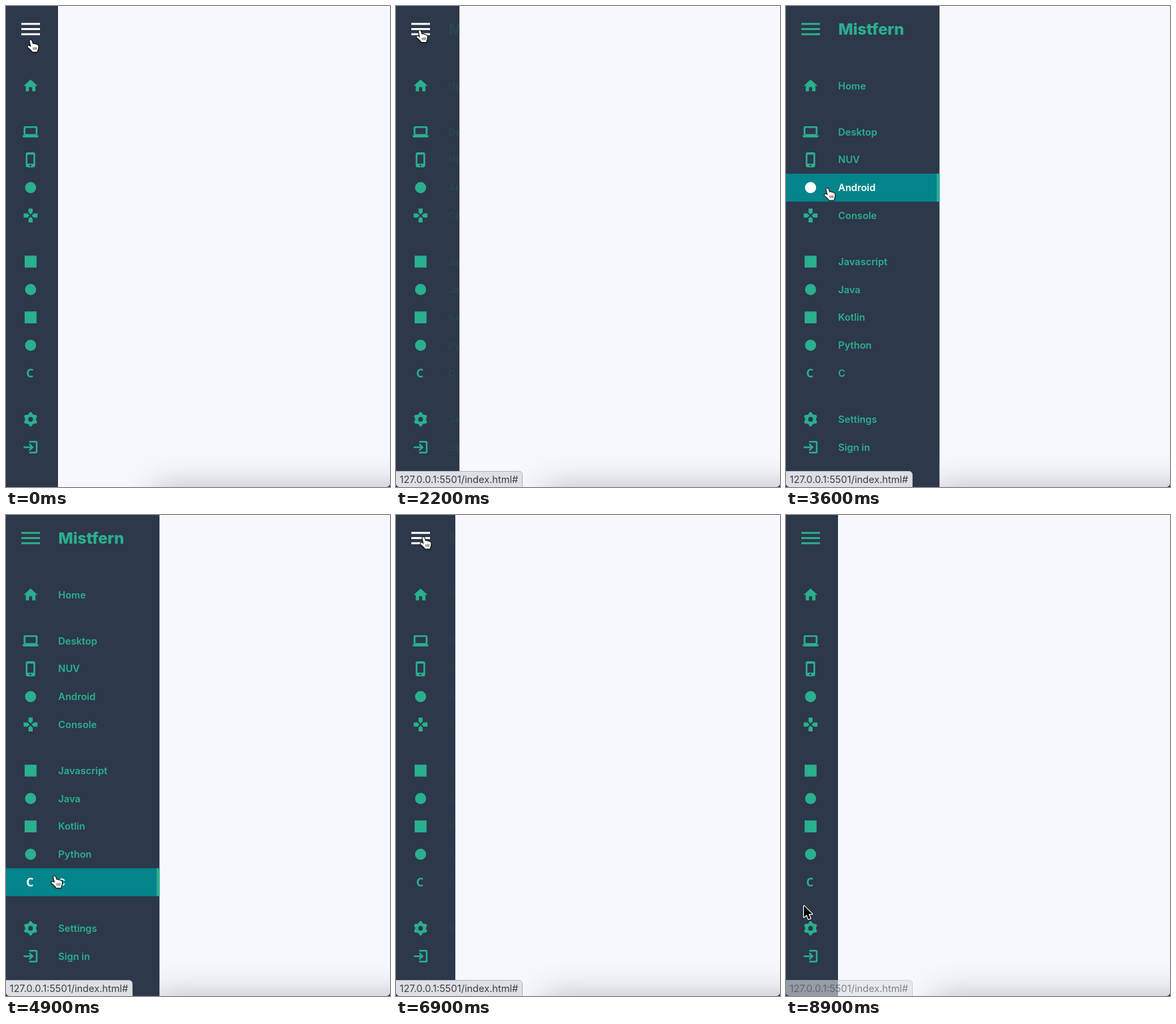
These frames come from a looping animation (576x720 px, 9000 ms). An HTML page with a canvas:

```html
<!DOCTYPE html>
<html lang="en">
<head>
<meta charset="utf-8">
<title>Sidebar menu</title>
<style>
html, body { margin: 0; width: 100%; height: 100%; overflow: hidden; background: #f7f8fe; }
canvas { display: block; }
</style>
</head>
<body>
<canvas id="stage" width="576" height="720"></canvas>
<script>
const ctx = document.getElementById('stage').getContext('2d');
const W = 576, H = 720, LOOP = 9000, STEP = 100;
const CLOSED = 78, OPEN = 230.5;
const SLIDE = 500, HOVER_LAG = 10;
const PITCH = 41.75, GROUP_PITCH = 69;
const MENU_Y = 34.5;
const GREEN = '#2aaf8f', NAVY = '#2d384a', TEAL = '#03858b', WHITE = '#fff';

const groups = [
  { Home: 'home' },
  { Desktop: 'laptop', NUV: 'phone', Android: 'dot', Console: 'pad' },
  { Javascript: 'square', Java: 'dot', Kotlin: 'square', Python: 'dot', C: 'letter' },
  { Settings: 'gear', 'Sign in': 'login' }
];
const rows = layout(119.4);

function layout(y) {
  const list = [];
  for (const group of groups) {
    for (const [label, icon] of Object.entries(group)) {
      list.push({ label, icon, y });
      y += PITCH;
    }
    y += GROUP_PITCH - PITCH;
  }
  return list;
}

// Icons on a 24 unit grid; inner shapes become holes
const shape = build => { const p = new Path2D(); build(p); return p; };
const TURN = 2 * Math.PI;

const icons = {
  home: new Path2D('M9.8 20V14H14.2V20H19V12H22L12 3L2 12H5V20Z'),
  laptop: shape(p => {
    p.roundRect(2, 4, 20, 13, 2);
    p.rect(4.6, 6.4, 14.8, 8.8);
    p.roundRect(.4, 17, 23.2, 3, [0, 0, 2, 2]);
  }),
  phone: shape(p => {
    p.roundRect(5, 1.2, 13.6, 21.8, 2.6);
    p.rect(7.5, 4.6, 8.6, 13);
    p.arc(11.8, 20.2, 1.3, 0, TURN);
  }),
  pad: shape(p => {
    const arm = new Path2D('M9 2H15V7.5L12 10.5L9 7.5Z');
    for (let i = 0; i < 4; i++)
      p.addPath(arm, new DOMMatrix().translate(12, 12).rotate(90 * i).translate(-12, -12));
  }),
  gear: shape(p => {
    // Six teeth, each an inner-outer-outer-inner run around the hub
    for (let i = 0; i < 24; i++) {
      const side = i % 4 - 1.5;
      const r = Math.abs(side) < 1 ? 10.2 : 8;
      const a = (Math.floor(i / 4) / 6 - .25) * TURN + side * .25;
      p.lineTo(12 + r * Math.cos(a), 12 + r * Math.sin(a));
    }
    p.closePath();
    p.moveTo(15.4, 12);
    p.arc(12, 12, 3.4, 0, TURN);
  }),
  login: new Path2D('M11 6.6L9.4 8.3L11.9 10.8H2V13.2H11.9L9.4 15.7L11 17.4L16.4 12ZM19.6 18.6H10V21H20A2 2 0 0 0 22 19V5A2 2 0 0 0 20 3H10V5.4H19.6Z'),
  dot: shape(p => p.arc(12, 12, 8, 0, TURN)),
  square: shape(p => p.rect(3.4, 3.4, 17.2, 17.2))
};

const hand = new Path2D('M-1.6 1.5C-1 -.4 1 -.3 1.6 1.2L3.3 6C4.8 5 6 5.5 6.4 6.5C7.8 5.8 8.8 6.3 9.2 7.3C10.5 7 11.4 7.8 11.4 9.3L11.2 12C11 14.2 10 15 9.8 17.6H2.8C2 15.6 -1.5 13 -4 10.8C-5 9.4 -3.6 8.1 -2.2 8.8L.6 10.2Z');
const creases = new Path2D('M3.6 11L4.4 14.6M6 10.6L6.6 14.4M8.3 10.6L8.6 14.2');
const arrow = new Path2D('M0 0V17L4 13.3L6.8 20L9.6 18.8L6.8 12.3H12.3Z');

// Turning points of the pointer; it slows down at each one
const turns = [
  { t: 0, x: 37, y: 51 },
  { t: 400, x: 35.5, y: 36.5 },
  { t: 2600, x: 35.5, y: 36.5 },
  { t: 3000, x: 55, y: 118 },
  { t: 3100, x: 62, y: 490 },
  { t: 3200, x: 62, y: 490 },
  { t: 4025, x: 62, y: 34 },
  { t: 5245, x: 75, y: 655 },
  { t: 6180, x: 48, y: 34 },
  { t: 6400, x: 41, y: 33 },
  { t: 7200, x: 41, y: 33 },
  { t: 7600, x: 36, y: 490 },
  { t: 7700, x: 36, y: 490 },
  { t: 8000, x: 36, y: 645 },
  { t: 8350, x: 36, y: 162 },
  { t: 8900, x: 27, y: 585 }
];

const clamp = v => Math.max(0, Math.min(1, v));
const mix = (a, b, k) => a + (b - a) * k;
const swing = k => (1 - Math.cos(Math.PI * clamp(k))) / 2;

// Standard CSS ease curve
function ease(x) {
  const bezier = (s, p, q) => 3 * s * (1 - s) ** 2 * p + 3 * s * s * (1 - s) * q + s ** 3;
  if (x <= 0 || x >= 1) return clamp(x);
  let lo = 0, hi = 1;
  for (let i = 0; i < 24; i++) {
    const s = (lo + hi) / 2;
    bezier(s, .25, .25) < x ? lo = s : hi = s;
  }
  return bezier(lo, .1, 1);
}

// Each click on the menu button toggles the panel
const clicks = [300, 1250, 2144, 6564];
const openness = t =>
  clicks.reduce((sum, at, i) => sum + (i % 2 ? -1 : 1) * ease((t - at) / SLIDE), 0);

function pointer(t) {
  const next = Math.max(1, turns.findIndex(p => p.t >= t));
  const a = turns[next - 1], b = turns[next];
  const k = swing((t - a.t) / (b.t - a.t));
  return { x: mix(a.x, b.x, k), y: mix(a.y, b.y, k) };
}

function text(str, x, y, font, color) {
  ctx.font = font;
  ctx.fillStyle = color;
  ctx.fillText(str, x, y);
}

function drawIcon(name, y, color) {
  if (name === 'letter') {
    text('C', 30.3, y + 6.4, 'bold 17.5px "Noto Sans", sans-serif', color);
    return;
  }
  ctx.save();
  ctx.translate(24.4, y - 12.5);
  ctx.scale(1.04, 1.04);
  ctx.fillStyle = color;
  ctx.fill(icons[name], 'evenodd');
  ctx.restore();
}

function drawPage() {
  ctx.fillStyle = '#f7f8fe';
  ctx.fillRect(0, 0, W, H);
  ctx.save();
  ctx.shadowColor = 'rgba(0,0,0,.28)';
  ctx.shadowBlur = 52;
  ctx.fillStyle = '#000';
  ctx.fillRect(222, H + 3, 420, 60);
  ctx.restore();
}

function drawPanel(open, active, menuHover) {
  const width = mix(CLOSED, OPEN, open);
  const tint = row => row === active ? WHITE : GREEN;
  ctx.save();
  ctx.beginPath();
  ctx.rect(0, 0, width, H);
  ctx.clip();
  ctx.fillStyle = NAVY;
  ctx.fillRect(0, 0, width, H);

  if (active) {
    const top = active.y - PITCH / 2;
    ctx.fillStyle = TEAL;
    ctx.fillRect(0, top, width, PITCH);
    ctx.fillStyle = GREEN;
    ctx.fillRect(width - 4.5, top, 4.5, PITCH);
  }

  ctx.fillStyle = menuHover ? WHITE : GREEN;
  for (let i = -1; i <= 1; i++) ctx.fillRect(23, MENU_Y + 7.7 * i - 1.45, 28, 2.9);

  for (const row of rows) drawIcon(row.icon, row.y, tint(row));

  ctx.globalAlpha = clamp(open);
  text('Mistfern', 78.5, 43, '800 23.5px Inter, sans-serif', GREEN);
  for (const row of rows)
    text(row.label, 78.3, row.y + 5.1, '600 14.6px Inter, sans-serif', tint(row));
  ctx.restore();
}

function drawStatus(alpha) {
  ctx.save();
  ctx.globalAlpha = alpha;
  ctx.beginPath();
  ctx.roundRect(-2, 696.5, 191.5, 30, [0, 5, 0, 0]);
  ctx.fillStyle = '#dddfe4';
  ctx.fill();
  ctx.strokeStyle = '#b4b6bb';
  ctx.stroke();
  text('127.0.0.1:5501/index.html#', 5.5, 713.5, '14.6px Inter, sans-serif', '#3d3f44');
  ctx.restore();
}

function drawCursor(p, linked) {
  const outline = linked ? hand : arrow;
  ctx.save();
  ctx.translate(p.x, p.y);
  ctx.lineJoin = 'round';
  ctx.shadowColor = 'rgba(0,0,0,.35)';
  ctx.shadowBlur = 2;
  ctx.shadowOffsetY = 1;
  ctx.lineWidth = linked ? 1.8 : 2.4;
  ctx.strokeStyle = linked ? '#000' : WHITE;
  ctx.fillStyle = linked ? WHITE : '#000';
  ctx.stroke(outline);
  ctx.shadowColor = 'transparent';
  ctx.fill(outline);
  if (linked) {
    ctx.lineWidth = .8;
    ctx.stroke(creases);
  }
  ctx.restore();
}

function drawCorners() {
  ctx.fillStyle = '#1d2b38';
  ctx.fill(new Path2D('M0 715A5 5 0 0 0 5 720H0ZM576 715A5 5 0 0 1 571 720H576Z'));
}

function draw(t) {
  const over = pointer(Math.max(0, t - HOVER_LAG));
  const active = rows.find(row => Math.abs(over.y - row.y) < PITCH / 2);
  const menuHover = over.x < 47 && Math.abs(over.y - MENU_Y) < 26;
  const statusAlpha = clamp((t - 100) / 200) * clamp((9050 - t) / 250);
  drawPage();
  drawPanel(openness(t), active, menuHover);
  drawStatus(statusAlpha);
  drawCursor(pointer(t), active || menuHover);
  drawCorners();
}

const start = performance.now();
function tick() {
  const t = (performance.now() - start) % LOOP;
  draw(Math.floor(t / STEP) * STEP);
  requestAnimationFrame(tick);
}
tick();
</script>
</body>
</html>
```
